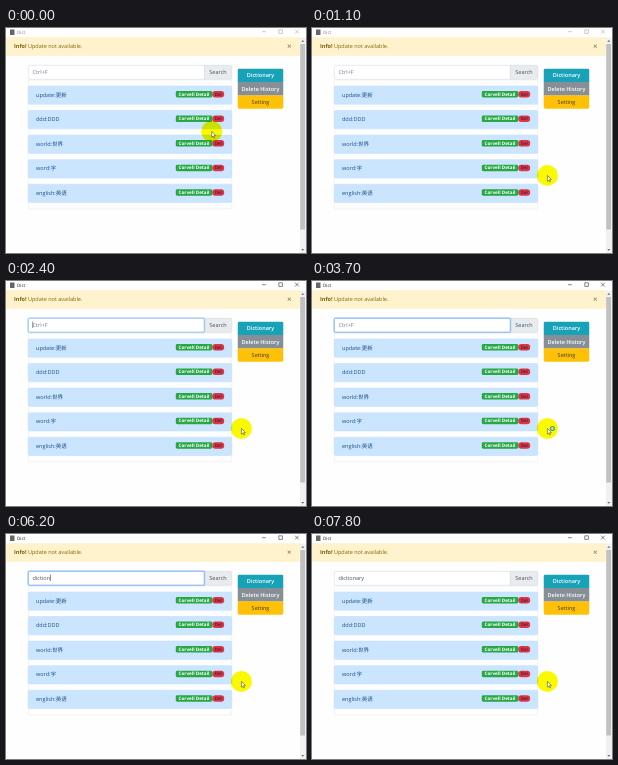
These frames come from a looping animation (300x225 px, 8000 ms). An HTML page with a canvas:

```html
<!DOCTYPE html>
<html lang="en">
<head>
<meta charset="utf-8">
<title>Dict</title>
<style>
html, body { margin: 0; width: 100%; height: 100%; overflow: hidden; background: #fff; }
canvas { display: block; width: 300px; height: 225px; }
</style>
</head>
<body>
<canvas id="stage"></canvas>
<script>
const LOOP = 8000, STEP = 100;
const ACTIVATE = 1200, FOCUS = 2200, BLUR = 7600;
const BUSY_FROM = 3300, BUSY_TO = 5900;
const FONT = '"Open Sans", "Noto Sans CJK SC", "Noto Sans CJK", sans-serif';

const canvas = document.getElementById('stage');
const ctx = canvas.getContext('2d');
const scale = Math.max(1, window.devicePixelRatio || 1);
canvas.width = 300 * scale;
canvas.height = 225 * scale;
ctx.textRendering = 'geometricPrecision';

const entries = ['update:更新', 'ddd:DDD', 'world:世界', 'word:字', 'english:英语'];

// Two bursts of typing, each slowing down slightly
const keys = [['dic', 4920], ['tionary', 5720]].flatMap(([part, start]) =>
  [...part].map((char, i) => ({ char, time: start + 150 * i + 3 * i * i })));

const clamp = v => Math.min(1, Math.max(0, v));
const bezier = (a, b, c, u) => a * (1 - u) ** 2 + 2 * b * u * (1 - u) + c * u * u;

function rect(x, y, w, h, fill) {
  ctx.fillStyle = fill;
  ctx.fillRect(x, y, w, h);
}

function box(x, y, w, h, radius, fill, stroke, lineWidth = 0.5) {
  ctx.beginPath();
  ctx.roundRect(x, y, w, h, radius);
  if (fill) { ctx.fillStyle = fill; ctx.fill(); }
  if (stroke) { ctx.strokeStyle = stroke; ctx.lineWidth = lineWidth; ctx.stroke(); }
}

function text(str, x, y, color, { size = 5.5, weight = 400, align = 'left' } = {}) {
  ctx.font = `${weight} ${size}px ${FONT}`;
  ctx.textAlign = align;
  ctx.fillStyle = color;
  ctx.fillText(str, x, y);
  return ctx.measureText(str).width;
}

function line(x1, y1, x2, y2, color, width = 0.5) {
  ctx.beginPath();
  ctx.moveTo(x1, y1);
  ctx.lineTo(x2, y2);
  ctx.strokeStyle = color;
  ctx.lineWidth = width;
  ctx.stroke();
}

function polygon(points, fill) {
  ctx.beginPath();
  points.forEach(([x, y]) => ctx.lineTo(x, y));
  ctx.closePath();
  ctx.fillStyle = fill;
  ctx.fill();
}

function circle(x, y, r) {
  ctx.beginPath();
  ctx.arc(x, y, r, 0, Math.PI * 2);
}

function drawTitleBar(active) {
  const ink = active ? '#111' : '#999';
  rect(4, 1.5, 4.5, 5.5, '#666');
  text('Dict', 11, 5.9, active ? '#222' : '#888', { size: 4.5 });
  line(256, 3.7, 259.8, 3.7, ink);
  box(272.8, 1.8, 3.6, 3.6, 0, null, ink);
  line(289, 1.7, 292.8, 5.5, ink);
  line(292.8, 1.7, 289, 5.5, ink);
}

function drawAlert() {
  rect(0, 9.5, 294, 18, '#fff3cd');
  line(0, 9.7, 294, 9.7, '#ffeeba');
  line(0, 27.3, 294, 27.3, '#ffeeba');
  const w = text('Info!', 8, 20, '#7d5e04', { weight: 700 });
  text(' Update not available.', 8 + w, 20, '#856404');
  text('×', 283.2, 20.6, '#8f8257', { size: 8, weight: 600, align: 'center' });
}

function drawScrollbar() {
  rect(294, 9.5, 6, 215.5, '#f1f1f1');
  rect(294.2, 16, 4.8, 185.5, '#c1c1c1');
  polygon([[295.3, 13.8], [298.3, 13.8], [296.8, 12]], '#666');
  polygon([[295.3, 221], [298.3, 221], [296.8, 222.8]], '#666');
}

function drawButtons() {
  const buttons = [
    ['Dictionary', '#17a2b8', '#fff', 600],
    ['Delete History', '#868e96', '#fff', 600],
    ['Setting', '#ffc107', '#3d3a2c', 400]
  ];
  ctx.save();
  box(231.5, 40.5, 46, 40.3, 2);
  ctx.clip();
  buttons.forEach(([label, fill, ink, weight], i) => {
    const y = 40.5 + i * 13.45;
    rect(231.5, y, 46, 13.6, fill);
    text(label, 254.5, y + 8.6, ink, { weight, align: 'center' });
  });
  ctx.restore();
}

function drawEntries() {
  box(22.3, 52, 203.4, 128.8, 1, null, '#e6e6e6');
  entries.forEach((label, i) => {
    const y = 58 + i * 24.55;
    box(22.3, y, 203.4, 18.3, 1.4, '#cce5ff', '#b8daff');
    text(label, 30, y + 10.7, '#17508c');
    box(169.8, y + 5, 36.4, 6.5, 1.4, '#28a745');
    text('Corvell Detail', 188, y + 9.8, '#fff', { size: 4.6, weight: 700, align: 'center' });
    box(206.2, y + 5, 12, 6.5, 3.2, '#dc3545');
    text('Del', 212.2, y + 9.8, '#3a2038', { size: 4.4, weight: 600, align: 'center' });
  });
}

function caretVisible(t, pressed) {
  if (t < FOCUS || t >= BLUR) return false;
  const since = pressed.length ? pressed[pressed.length - 1].time : FOCUS;
  return Math.floor((t - since) / 500) % 2 === 0;
}

function drawSearch(t) {
  box(198, 37.3, 27.8, 14, [0, 1.5, 1.5, 0], '#e9ecef', '#ced4da');
  text('Search', 212, 46, '#495057', { align: 'center' });
  box(22.3, 37.3, 176, 14, [1.5, 0, 0, 1.5], '#fff', '#ced4da');

  const focus = t < BLUR ? clamp((t - FOCUS + STEP) / 400) : 1 - clamp((t - BLUR + STEP) / 300);
  ctx.globalAlpha = focus;
  box(22, 37, 176.6, 14.4, 1.5, null, 'rgba(0,123,255,.2)', 1.8);
  box(22.3, 37.3, 176, 14, 1.5, null, '#80b4f5', 0.6);
  ctx.globalAlpha = 1;

  const pressed = keys.filter(key => key.time <= t);
  const typed = pressed.map(key => key.char).join('');
  const width = typed ? text(typed, 26.6, 45.6, '#495057') : 0;
  if (!typed) text('Ctrl+F', 26.6, 45.6, '#737b83');
  if (caretVisible(t, pressed)) rect(26.6 + width, 40.6, 0.5, 6.4, '#222');
}

function drawPointer(t) {
  const u = clamp((t - 400) / 700);
  const x = bezier(205.7, 208.4, 235.4, u);
  const y = bezier(103.4, 147.4, 147.4, u);

  ctx.globalCompositeOperation = 'multiply';
  circle(x, y, 10.5);
  ctx.fillStyle = '#fcfa00';
  ctx.fill();
  ctx.globalCompositeOperation = 'source-over';

  const arrow = [[0, 0], [0, 5.8], [1.3, 4.6], [2.2, 6.6], [3.1, 6.2], [2.2, 4.2], [4, 4.1]];
  polygon(arrow.map(([dx, dy]) => [x + dx, y + dy]), '#fff');
  ctx.strokeStyle = '#333';
  ctx.lineWidth = 0.5;
  ctx.stroke();

  if (t >= BUSY_FROM && t < BUSY_TO) {
    circle(x + 5, y, 1.9);
    ctx.strokeStyle = '#2b93d1';
    ctx.lineWidth = 1.2;
    ctx.stroke();
  }
}

function render(now) {
  const t = Math.floor((now % LOOP) / STEP) * STEP;
  ctx.setTransform(scale, 0, 0, scale, 0, 0);
  rect(0, 0, 300, 225, '#fefefe');
  drawTitleBar(t >= ACTIVATE);
  drawAlert();
  drawScrollbar();
  drawEntries();
  drawSearch(t);
  drawButtons();
  drawPointer(t);
}

const start = performance.now();
function tick() {
  render(performance.now() - start);
  requestAnimationFrame(tick);
}
tick();
</script>
</body>
</html>
```
